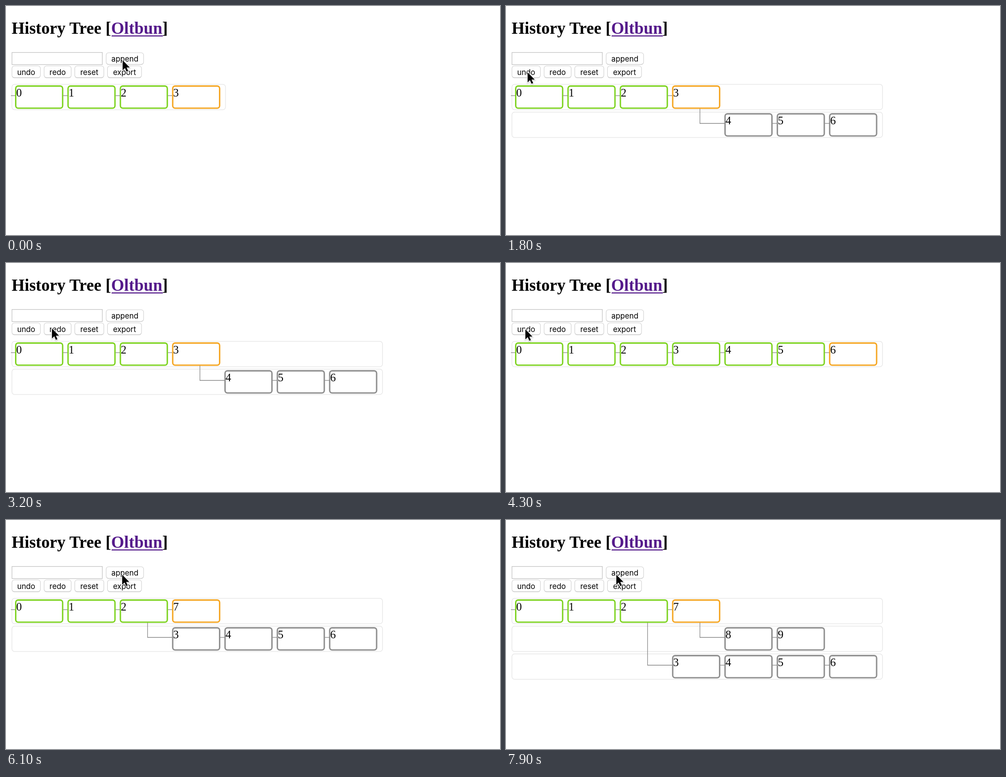
An HTML page for the animation above (8 s loop, 1097 px wide and 511 px high).

```html
<!DOCTYPE html>
<html lang="en">
<head>
<meta charset="utf-8">
<title>History Tree</title>
<style>
  html, body { margin: 0; width: 100%; height: 100%; overflow: hidden; background: #fff; }
  svg { display: block; width: 1097px; height: 511px; }
  .serif { font-family: "Liberation Serif", Times, serif; }
  .title { font-size: 37.2px; font-weight: bold; }
  .num { font-size: 24.8px; }
  .label { font: 16.8px Inter, sans-serif; text-anchor: middle; }
  .row { fill: none; stroke: #e7e7e7; stroke-width: 1.5; }
  .wire { fill: none; stroke: #858585; stroke-width: 1.3; }
  .box { fill: #fff; stroke-width: 3.1; }
  #cursor { filter: drop-shadow(0 1px 1px rgba(0, 0, 0, .3)); }
</style>
</head>
<body>
<svg viewBox="0 0 1097 511">
  <text class="serif title" x="12.4" y="62">History Tree [<tspan fill="#551a8b">Oltbun</tspan>]</text>
  <rect x="234.5" y="65.6" width="113.8" height="2.4" fill="#551a8b"/>
  <rect x="13.3" y="103.7" width="200.6" height="27" fill="#fff" stroke="#bdbdbd" stroke-width="1.2"/>
  <g id="buttons"></g>
  <g id="tree"></g>
  <path id="cursor" d="M0 0V22.5L5.2 17.6L8.7 25.6L12.3 24L8.8 16.2H15.8Z"
    stroke="#fff" stroke-width="2.4" paint-order="stroke"/>
</svg>
<script>
const LOOP = 8000, STEP = 100;
const COL = 116.2, ROW = 62;
const GREEN = "#7ed321", ORANGE = "#f5a623", GREY = "#8f8f8f";
const el = id => document.getElementById(id);

// label, left, top, width
const BUTTONS = [
  ["append", 222.4, 104.2, 83.2],
  ["undo", 13.2, 133.8, 63.2],
  ["redo", 84.6, 133.8, 60.2],
  ["reset", 152.7, 133.8, 64.6],
  ["export", 225.4, 133.8, 75.6]
];

// time, line of history, number of applied steps
const STATES = [
  [0, "0123", 4], [200, "01234", 5], [400, "012345", 6], [700, "0123456", 7],
  [1400, "0123456", 6], [1600, "0123456", 5], [1800, "0123456", 4],
  [1900, "0123456", 3], [2100, "0123456", 2], [2300, "0123456", 1],
  [2700, "0123456", 2], [2900, "0123456", 3], [3100, "0123456", 4],
  [3300, "0123456", 5], [3500, "0123456", 6], [3900, "0123456", 7],
  [4700, "0123456", 6], [4900, "0123456", 5], [5100, "0123456", 4], [5300, "0123456", 3],
  [6000, "0127", 4], [6200, "01278", 5], [6400, "012789", 6],
  [7000, "012789", 5], [7200, "012789", 4]
];
const FORK_AT = 6000, FORK = { col: 3, labels: "3456" };

// time, x, y of the pointer tip
const PATH = [
  [0, 259, 121], [800, 259, 121], [1200, 48, 148], [2300, 48, 148],
  [2400, 87, 145], [2600, 102, 146], [3900, 102, 146], [4300, 43, 148],
  [5400, 43, 148], [5900, 258, 122], [6600, 258, 122], [6700, 182, 134],
  [6900, 43, 148], [7500, 43, 148], [7900, 245, 122], [8000, 245, 122]
];

function button([label, x, y, w]) {
  return `<rect x="${x}" y="${y + 0.8}" width="${w}" height="26.2" rx="5.5" fill="#c4c4c4"/>
    <rect x="${x}" y="${y}" width="${w}" height="26" rx="5.5" fill="#fff" stroke="#cfcfcf" stroke-width="1.1"/>
    <text class="label" x="${x + w / 2}" y="${y + 19.8}">${label}</text>`;
}

function box(label, col, row, color) {
  const x = 21.6 + col * COL, y = 178.6 + row * ROW;
  return `<rect class="box" x="${x}" y="${y}" width="104.2" height="49.4" rx="5.5" stroke="${color}"/>
    <text class="serif num" x="${x + 1.1}" y="${y + 23}">${label}</text>`;
}

function wire(col, row) {
  const x = 12.9 + col * COL, y = 200 + row * ROW;
  return `<path class="wire" d="M${x - 2} ${y}H${x + 8}"/>`;
}

function branch(labels, col, row) {
  const x = 82 + (col - 1) * COL, y = 262 + (row - 1) * ROW;
  let s = `<path class="wire" d="M${x} 229V${y}H${21 + col * COL}"/>`;
  [...labels].forEach((n, i) => {
    if (i) s += wire(col + i, row);
    s += box(n, col + i, row, GREY);
  });
  return s;
}

function tree(line, done, forked) {
  const tail = line.slice(done);
  const rows = 1 + (tail ? 1 : 0) + (forked ? 1 : 0);
  const cols = Math.max(line.length, forked ? FORK.col + FORK.labels.length : 0);
  let s = "";
  for (let r = 0; r < rows; r++)
    s += `<rect class="row" x="13.2" y="${174.8 + r * ROW}" width="${9.4 + cols * COL}" height="56.8" rx="6"/>`;
  if (forked) s += branch(FORK.labels, FORK.col, rows - 1);
  if (tail) s += branch(tail, done, 1);
  [...line.slice(0, done)].forEach((n, i) => {
    s += wire(i, 0) + box(n, i, 0, i === done - 1 ? ORANGE : GREEN);
  });
  return s;
}

function pointer(t) {
  const i = PATH.findIndex((p, k) => k && t < p[0]);
  const [t0, x0, y0] = PATH[i - 1], [t1, x1, y1] = PATH[i];
  const u = (t - t0) / (t1 - t0), e = u * u * (3 - 2 * u);
  return [x0 + (x1 - x0) * e, y0 + (y1 - y0) * e];
}

let shown;
function draw(now) {
  const t = Math.floor(now % LOOP / STEP) * STEP;
  const state = STATES.filter(s => s[0] <= t).pop();
  if (state !== shown) {
    shown = state;
    el("tree").innerHTML = tree(state[1], state[2], t >= FORK_AT);
  }
  el("cursor").setAttribute("transform", `translate(${pointer(t)})`);
}

el("buttons").innerHTML = BUTTONS.map(button).join("");
const start = performance.now();
function tick() {
  draw(performance.now() - start);
  requestAnimationFrame(tick);
}
tick();
</script>
</body>
</html>
```
